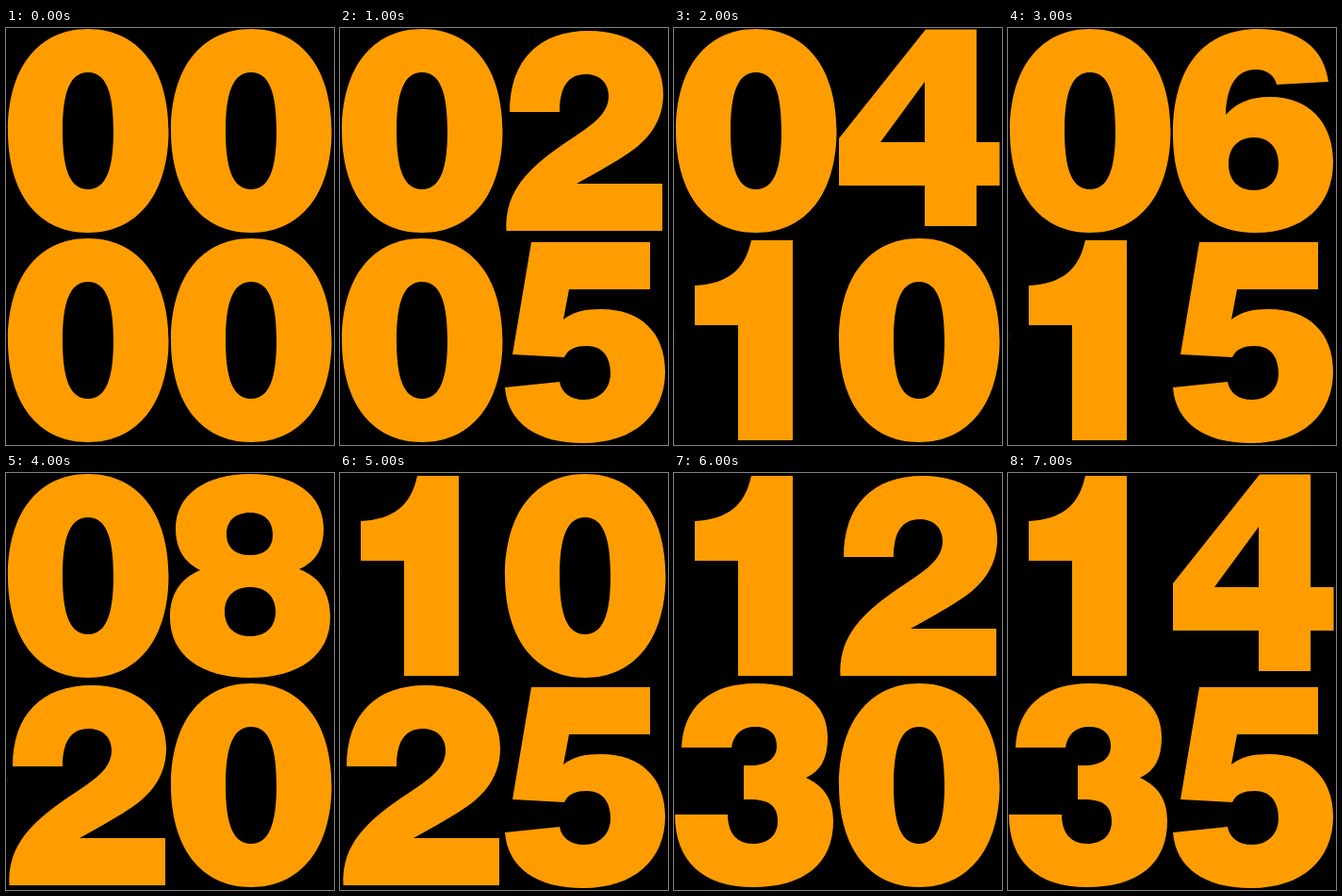
Recreate the animation shown at these times as an HTML page. Size 348x442 px, loop 8000 ms.

```html
<!DOCTYPE html>
<html lang="en">
<head>
<meta charset="utf-8">
<title>Counter</title>
<style>
html, body { margin: 0; width: 100%; height: 100%; overflow: hidden; background: #000; }
svg { display: block; width: 348px; height: 442px; }
path { fill: #ff9d00; fill-rule: evenodd; }
</style>
</head>
<body>
<svg viewBox="0 0 348 442">
  <path/>
  <path transform="translate(173 0)"/>
  <path transform="translate(0 222)"/>
  <path transform="translate(173 222)"/>
</svg>
<script>
const glyphs = {
  0: 'M87 1C33 1 2 44 2 109S33 217 87 217S172.5 174 172.5 109S141 1 87 1ZM87 47C68 47 60 68 60 109S68 171 87 171S114 150 114 109S106 47 87 47Z',
  1: 'M82 3H126V215H68V93H22V51C57 49 75 35 82 3Z',
  2: 'M7 89C7 34 38 3 91 3C139 3 170 29 170 70C170 97 156 117 134 132C110 148 92 157 78 165H169V215H3.5C2 179 19 155 57 128C88 106 112 95 112 72C112 58 102 49 88 49C68 49 60 64 60 89Z',
  3: 'M8 69C10 26 38 1 87 1C134 1 163 22 163 58C163 80 156 94 140 101C160 110 169 125 169 147C169 192 138 217 84 217C31 217 1 190 1 140H57C57 160 67 171 84 171C100 171 110 162 110 147C110 130 100 124 80 124H74V88H80C100 88 109 80 109 67C109 54 100 47 86 47C72 47 63 55 61 69Z',
  4: 'M94 1.5H148V121H172.5V167H148V210H93V167H2V117ZM93 57V121H46Z',
  5: 'M30 5H156V55H70L64 87C74 79 86 76 104 76C146 76 172 101 172 142C172 188 139 218 85 218C36 218 5 197 2 159L60 153C62 165 72 172 86 172C103 172 114 160 114 144C114 126 105 115 89 115C77 115 69 118 65 127L10 124Z',
  6: 'M167 57L112 60C110 50 101 44 90 44C70 44 59 60 58 92C70 79 84 73 105 73C146 73 172 100 172 142C172 188 140 217 90 217C32 217 2 178 2 112C2 42 34 1 93 1C136 1 162 21 167 57ZM88 116C71 116 61 127 61 144S71 172 88 172S114 161 114 144S104 116 88 116Z',
  8: 'M86 1C133 1 164 23 164 59C164 80 156 94 138 102C160 110 171 127 171 153C171 193 138 217 86 217S1 193 1 153C1 128 12 112 33 103C15 94 7 79 7 59C7 23 39 1 86 1ZM86 42C70 42 61 51 61 65S70 87 86 87S110 79 110 65S101 42 86 42ZM86 121C69 121 59 131 59 147S69 173 86 173S113 163 113 147S103 121 86 121Z'
};
const STEP = 1000, STEPS = 8;
const cells = document.querySelectorAll('path');
const pad = n => String(n).padStart(2, '0');
let shown = -1;

function draw(ms) {
  const n = Math.floor(ms / STEP) % STEPS;
  if (n === shown) return;
  shown = n;
  const digits = pad(2 * n) + pad(5 * n);
  cells.forEach((cell, i) => cell.setAttribute('d', glyphs[digits[i]]));
}

const start = performance.now();
function tick() {
  draw(performance.now() - start);
  requestAnimationFrame(tick);
}
tick();
</script>
</body>
</html>
```
